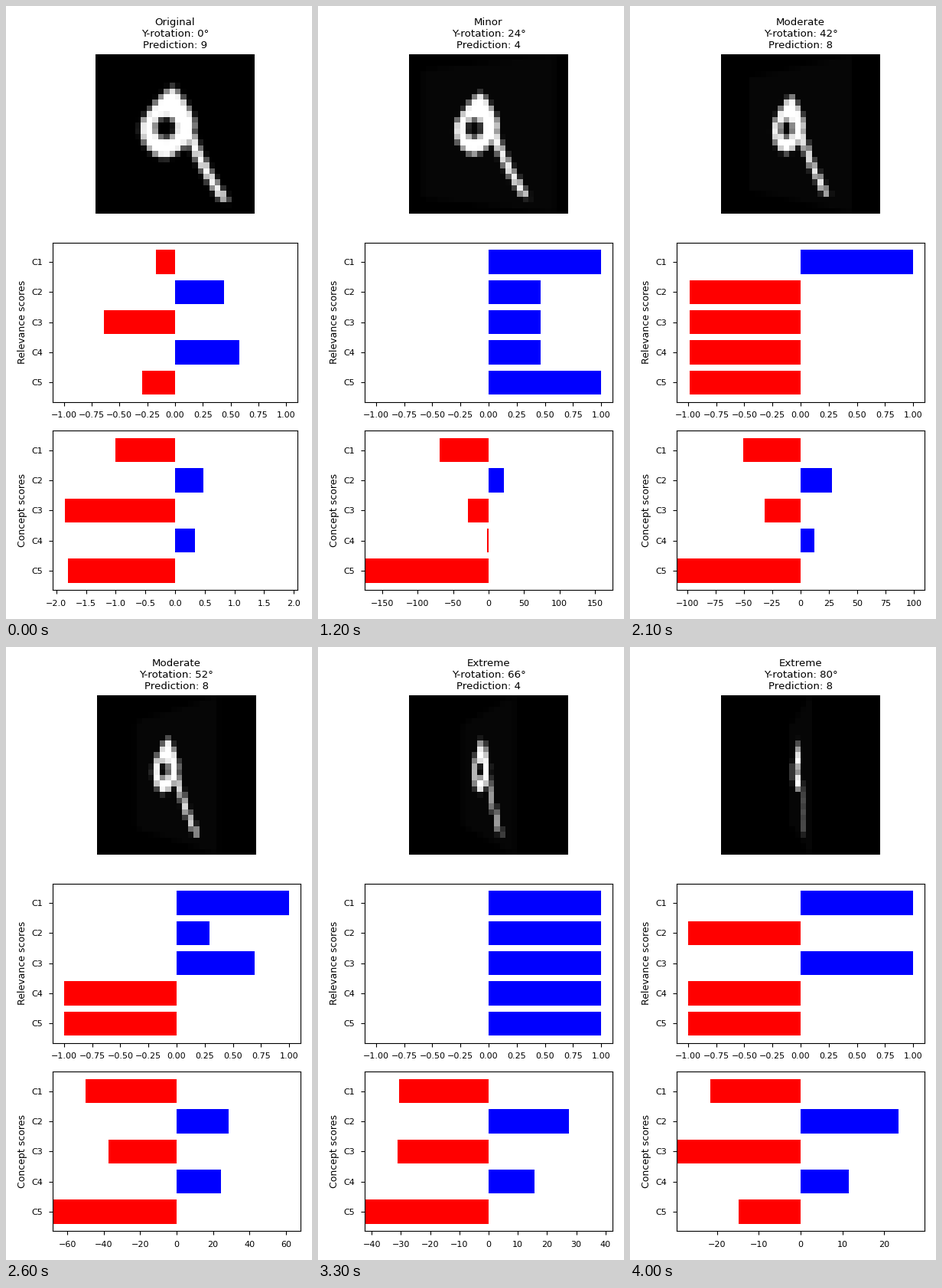
A matplotlib script that plays this animation: 400x800 px, repeating every 4.1 s.

```python
import numpy as np
import matplotlib.pyplot as plt
from matplotlib.animation import FuncAnimation

W, H = 400, 800
FRAMES, STEP_MS, DEG_PER_FRAME = 41, 100, 2
CELLS, SUB = 28, 5
LEFT, RIGHT, TOP, BOTTOM, GAP = 61, 385, 63.2, 762.2, 37.8
NAMES = ["C1", "C2", "C3", "C4", "C5"]

# Steps at which the predicted digit changes
TURNS = np.array([11.5, 18.5, 29.5, 36.5])
DIGITS = "94848"

# Scores of the unturned digit
START_REL = [-0.172, 0.438, -0.637, 0.575, -0.295]
START_CON = [-1.01, 0.48, -1.858, 0.33, -1.8]


def oval(dx, dy, a, b, power):
    """Soft coverage of a superellipse."""
    r = (np.abs(dx / a) ** power + np.abs(dy / b) ** power) ** (1 / power)
    return np.clip(0.5 + 1.5 * a * (1 - r), 0, 1)


def nine(x, y):
    """Ink of the digit at a point given in cells."""
    dy = y - 12
    body = oval(x - 12.8 + 0.12 * dy, dy, 4.7 * (1 + 0.05 * dy), 6.2, 1.5)
    hole = oval(x - 12.3, y - 12.9, 1.8, 1.9, 2)
    t = y - 14.5
    off = np.abs(x - 16.8 - 0.36 * t - 0.0154 * t * t)
    tail = np.clip(1.6 - 1.3 * off, 0, 1) * np.clip(y - 13, 0, 1) * np.clip(26.2 - y, 0, 1)
    return np.maximum(body * (1 - hole), tail)


FINE = (np.arange(CELLS * SUB) + 0.5) / SUB
GX, GY = np.meshgrid(FINE, FINE)


def to_cells(fine):
    return fine.reshape(CELLS, SUB, CELLS, SUB).mean(axis=(1, 3))


def turned_digit(deg):
    """Digit turned about the vertical axis, left side receding."""
    half = CELLS / 2
    a = np.radians(deg)
    q = 0.25 * np.sin(a)
    px = (GX - half) * (1 + q) / (half * np.cos(a))
    inside = np.abs(px) < 1
    px = np.clip(px, -1, 1)
    u = (px + q) / (1 + q * px)
    v = (GY - half) / half * (1 - q * u) * (1 + 1.3 * q)
    inside &= np.abs(v) < 1
    img = to_cells(nine(half + half * u, half + half * v) * inside)
    haze = 0.027 * (deg > 0) * to_cells(inside.astype(float))
    return np.maximum(img / img.max(), haze)


def flips(i, start, times):
    """A saturated score that changes sign at the given steps."""
    return start * np.prod(np.tanh(np.subtract(times, i)))


def bump(i, centre, width):
    return np.exp(-((i - centre) / width) ** 2)


def relevance(i):
    if i == 0:
        return START_REL
    first, second, third, fourth = TURNS
    return [
        1,
        flips(i, -1, [first, second, 25.7, fourth]),
        flips(i, -1, [first, second, 25.15]),
        flips(i, -1, TURNS),
        flips(i, 1, [second, third, fourth]),
    ]


def concept(i):
    if i == 0:
        return START_CON
    return [
        -91.5 + 1.75 * i - 4 * np.cos(2 * np.pi * (i - 26.3) / 11),
        28.5 - 0.03 * (i - 27) ** 2,
        -29.6 - 8 * bump(i, 26.5, 5),
        11.5 + 13.5 * bump(i, 26.5, 6) - 14.5 * bump(i, 14, 7),
        np.interp(i, [1, 12, 16, 21, 26, 33, 40],
                  [-155, -175, -126.6, -109.5, -68, -42.4, -14.8]),
    ]


def level(deg):
    if deg == 0:
        return "Original"
    return "Minor" if deg <= 30 else "Moderate" if deg <= 60 else "Extreme"


fig, (ax_img, ax_rel, ax_con) = plt.subplots(3, 1, figsize=(W / 100, H / 100), dpi=100)
picture = ax_img.imshow(turned_digit(0), cmap="gray", vmin=0, vmax=1,
                        interpolation="nearest")
ax_img.set_axis_off()


def bar_panel(ax, label):
    bars = ax.barh(range(5), np.zeros(5), height=0.8)
    ax.set_ylim(4.64, -0.64)
    ax.set_yticks(range(5), NAMES)
    ax.tick_params(labelsize=8, pad=5.5)
    ax.set_ylabel(label, fontsize=9, labelpad=4)
    return bars


rel_bars = bar_panel(ax_rel, "Relevance scores")
con_bars = bar_panel(ax_con, "Concept scores")


def set_bars(ax, bars, values, limit):
    for bar, value in zip(bars, values):
        bar.set_width(value)
        bar.set_color("blue" if value > 0 else "red")
        bar.set_linewidth(0)
    ax.set_xlim(-limit, limit)


def place(right):
    row = (BOTTOM - TOP - 2 * GAP) / 3
    fig.subplots_adjust(left=LEFT / W, right=right, top=1 - TOP / H,
                        bottom=1 - BOTTOM / H, hspace=GAP / row)


def update(i):
    deg = i * DEG_PER_FRAME
    digit = DIGITS[np.sum(TURNS < i)]
    picture.set_data(turned_digit(deg))
    ax_img.set_title(f"{level(deg)}\nY-rotation: {deg}°\nPrediction: {digit}",
                     fontsize=9.6)
    scores = concept(i)
    margin = 1 if i else 1.11
    set_bars(ax_rel, rel_bars, relevance(i), 1.1)
    set_bars(ax_con, con_bars, scores, margin * np.abs(scores).max())
    # Make room for a tick label that sticks out on the right
    place(RIGHT / W)
    fig.tight_layout()
    place(min(fig.subplotpars.right, RIGHT / W))
    return []


anim = FuncAnimation(fig, update, frames=FRAMES, init_func=lambda: update(0),
                     interval=STEP_MS, repeat=True, repeat_delay=0, blit=False)
plt.show()
```
